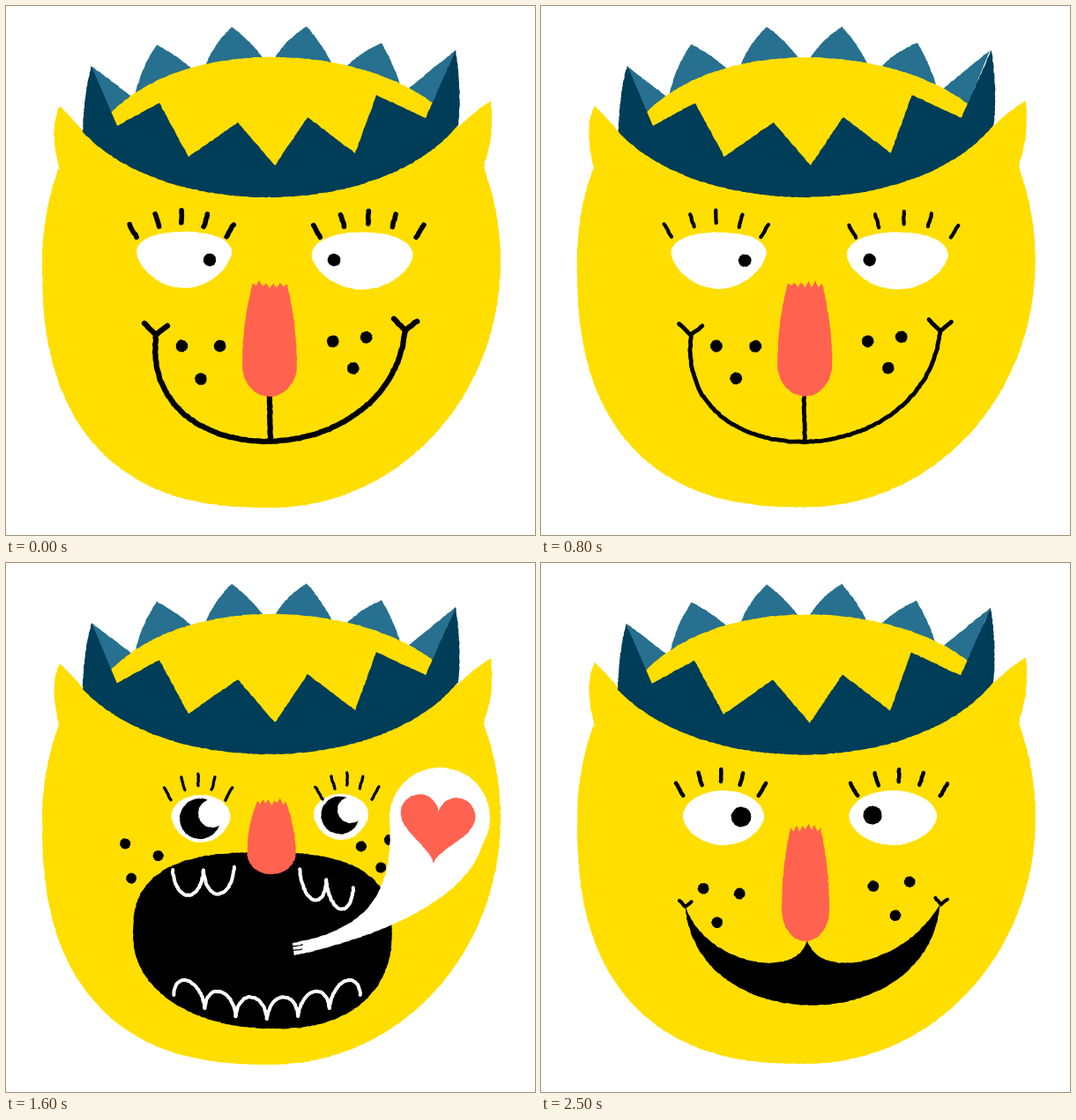
Write an HTML page with a canvas that moves like this. It is 600 px wide and 600 px high and loops after 2.6 s.

```html
<!DOCTYPE html>
<html lang="en">
<head>
<meta charset="utf-8">
<title>Yellow creature</title>
<style>
  html, body { margin: 0; width: 100%; height: 100%; overflow: hidden; background: #fff; }
  canvas { display: block; width: 100vw; height: 100vh; }
</style>
</head>
<body>
<canvas id="stage" width="600" height="600"></canvas>
<script>
const ctx = document.getElementById('stage').getContext('2d');
const YELLOW = '#ffde00', NAVY = '#003d58', TEAL = '#27708f', CORAL = '#ff6350';
const STEP = 100, STEPS = 26;

// eyes: x, y, rx, ry, lift of the corners
// pupils: dx, dy, radius, then dx, dy, radius of the glint
// nose: x, top, bottom, half width at top, half width at bottom
// spots: x, y, radius of the group, turn in degrees
const smile = {
  shift: [0, 0], line: 5.6, dot: 6.8,
  eyes: [[202, 288, 54, 32, -9], [404, 289, 57.5, 32.5, -7]],
  pupils: [[29, 0, 7.2, 6, -6, 0], [-32, -1, 7.2, 6, -6, 0]],
  nose: [299, 315, 443, 19.5, 31],
  spots: [[221, 398, 25, 0], [391, 389, 22, -7]]
};
const grin = {
  shift: [0, -1], line: 4.5, dot: 6.3,
  eyes: [[207, 289, 46, 31, -2], [399, 289, 50, 31, -2]],
  pupils: [[20, -1, 11.3, 8, -8, 0], [-23, -3, 10.5, 8, -8, 0]],
  nose: [300, 300, 429, 17, 27],
  spots: [[203, 384, 24, 8], [399, 376, 24, -7]]
};
const wide = {
  shift: [-2, -1.5], line: 4, dot: 5.9,
  eyes: [[218, 290.5, 38, 28.5, -2], [383, 289.5, 35, 28.5, -2]],
  pupils: [[4, 0, 21.5, 17, -13, 9], [-3, -4, 20.5, 16, -13, 9]],
  nose: [301, 283, 375, 23, 29],
  spots: [[165, 352, 25, 16], [417, 346, 22, -13]],
  mouth: [291.5, 425, 144.5, 54, 92],
  teeth: [[192, 387, 263, 375], [329, 376, 391, 382]], bite: 28,
  bubble: { head: [441, 386, 23], top: [390, 413, 405, 400], under: [435, 418, 385, 428] },
  heart: [438, 390, 0.5]
};
const open = {
  shift: [0, 0], line: 3.3, dot: 6,
  eyes: [[221, 290, 33.5, 27, -3], [380, 288, 31, 26, -3]],
  pupils: [[-1, 0, 23, 14, -6, 16], [-1, -2, 21.5, 12, -6, 15]],
  nose: [301, 270, 353, 16, 27.5],
  spots: [[150, 336, 23, 20], [421, 327, 19, -13]],
  mouth: [291, 420, 147, 92, 108],
  teeth: [[189, 348, 259, 345], [333, 347, 394, 368]], bite: 38,
  bubble: { head: [492, 289, 57], top: [415, 415, 440, 370], under: [520, 390, 400, 430] },
  heart: [489, 296, 2.65]
};

function mix(a, b) {
  if (typeof a === 'number') return (a + b) / 2;
  if (Array.isArray(a)) return a.map((v, i) => mix(v, b[i]));
  return Object.fromEntries(Object.keys(a).map(k => [k, mix(a[k], b[k])]));
}
const parting = { ...mix(grin, wide), mouth: [299, 424, 147, 22, 87] };
const POSES = [smile, grin, parting, wide, mix(wide, open), open];

let seed = 1, wobble = 0;
function rnd() {
  seed = (seed * 1664525 + 1013904223) >>> 0;
  return seed / 2147483648 - 1;
}

const range = (n, f) => Array.from({ length: n }, (_, i) => f(i));
const power = (v, e) => Math.sign(v) * Math.abs(v) ** e;

// Bezier curve of any degree, given as x, y, x, y, ...
function curve(...c) {
  return range(25, i => {
    let p = range(c.length / 2, k => [c[2 * k], c[2 * k + 1]]);
    while (p.length > 1) {
      p = p.slice(1).map((q, k) => q.map((v, d) => p[k][d] + (v - p[k][d]) * i / 24));
    }
    return p[0];
  });
}

function arc(x, y, rx, ry, from = 0, to = 2 * Math.PI) {
  return range(49, i => {
    const a = from + (to - from) * i / 48;
    return [x + rx * Math.cos(a), y + ry * Math.sin(a)];
  });
}

// Walks the points in short steps with a grainy, hand-drawn edge.
function trace(pts) {
  const dx = rnd() * wobble, dy = rnd() * wobble;
  ctx.beginPath();
  pts.forEach(([x, y], i) => {
    const [px, py] = pts[Math.max(0, i - 1)];
    const n = Math.ceil(Math.hypot(x - px, y - py) / 3) || 1;
    for (let s = 1; s <= n; s++) {
      ctx.lineTo(px + (x - px) * s / n + dx + rnd() * 0.4, py + (y - py) * s / n + dy + rnd() * 0.4);
    }
  });
}

function fill(pts, color) {
  trace(pts);
  ctx.closePath();
  ctx.fillStyle = color;
  ctx.fill();
}

function stroke(pts, width, color = '#000') {
  trace(pts);
  ctx.lineWidth = width;
  ctx.strokeStyle = color;
  ctx.stroke();
}

const disc = (x, y, r, color = '#000') => fill(arc(x, y, r, r), color);

function drawHead([dx, dy]) {
  const body = range(81, i => {
    const a = -0.38 + (Math.PI + 0.76) * i / 80;
    const c = Math.cos(a), s = Math.sin(a);
    const e = c < 0 && s > 0 ? 0.8 : 1;
    return [301 + 260 * power(c, e), 290 + (s < 0 ? 285 : 279) * power(s, e)];
  });
  ctx.save();
  ctx.translate(dx, dy);
  fill([
    ...body,
    ...curve(61, 187, 48, 138, 61, 114), ...curve(61, 114, 74, 126, 88, 143),
    ...curve(513, 137, 537, 115, 550, 108), ...curve(550, 108, 554, 148, 543, 177)
  ], YELLOW);
  ctx.restore();
}

function drawCrown(dy) {
  const bow = (x, top, k) => top + (x - 301) ** 2 / k;
  ctx.save();
  ctx.translate(0, dy);
  for (let i = 0; i < 4; i++) {
    const x = 171 + 85 * i, y = bow(x, 21, 735), skew = (300 - x) / 15;
    const l = x - 33 + skew, r = x + 32 + skew;
    const ly = bow(l, 58, 570), ry = bow(r, 58, 570);
    fill([...curve(l, ly, (l + x) / 2 - 5, (ly + y) / 2 - 3, x, y),
          ...curve(x, y, (r + x) / 2 + 3, (ry + y) / 2 - 2, r, ry), [x, 110]], TEAL);
  }
  fill([[97, 68], [143, 103], [118, 124]], TEAL);
  fill([[510, 50], [457, 93], [484, 112]], TEAL);
  fill([...curve(119, 121, 205, 34, 395, 43, 484, 110), [500, 140], [300, 200], [110, 145]], YELLOW);
  fill([
    ...curve(97, 68, 88, 100, 87, 143), ...curve(87, 143, 180, 243, 425, 243, 513, 135),
    ...curve(513, 135, 517, 95, 510, 50),
    [476, 127], [420, 101], [396, 167], [342, 126], [305, 181], [263, 132], [207, 171], [174, 110], [126, 136]
  ], NAVY);
  ctx.restore();
}

function drawEye([x, y, rx, ry, lift], [px, py, pr, gx, gy, gr], lean, width) {
  fill(arc(0, 0, 1, 1).map(([c, s]) => [x + rx * c, y + ry * power(s, 1.1) + lift * c * c]), '#fff');
  disc(x + px, y + py, pr);
  if (gr) disc(x + px + gx, y + py + gy, gr, '#fff');
  for (let u = -1; u <= 1; u += 0.5) {
    const lx = x + lean + (rx + 5) * u, ly = y - ry - 24 + 16 * u * u;
    stroke([[lx, ly], [lx - 8 * u, ly + 14]], width);
  }
}

function drawSpots([x, y, r, turn], size) {
  for (let k = 0; k < 3; k++) {
    const a = (90 + turn + 120 * k) * Math.PI / 180;
    disc(x + r * Math.cos(a), y + r * Math.sin(a), size);
  }
}

function drawNose([x, top, bottom, wt, wb]) {
  const low = top + (bottom - top) * 0.72, mid = (top + low) / 2;
  const ragged = range(9, i => [x + wt * (1 - (i + 1) / 5), top + (i % 2 ? -2 : 4) + rnd() * 2]);
  fill([
    ...curve(x - wt, top, x - wb, mid, x - wb, low),
    ...arc(x, low, wb, bottom - low, Math.PI, 0),
    ...curve(x + wb, low, x + wb, mid, x + wt, top),
    ...ragged
  ], CORAL);
}

function drawCorner(x, y, size, width) {
  stroke([[x - size, y - size], [x, y], [x + size, y - 0.8 * size]], width);
}

function drawSmile(width) {
  stroke(curve(170, 373, 150, 535, 435, 535, 453, 368), width);
  stroke([[299, 443], [300, 494]], width);
  drawCorner(170, 373, 13, width);
  drawCorner(453, 368, 13, width);
}

function drawGrin() {
  fill([
    ...curve(163, 388, 185, 455, 290, 475, 302, 428),
    ...curve(302, 428, 316, 475, 415, 455, 453, 386),
    ...curve(453, 386, 440, 540, 175, 540, 163, 388)
  ], '#000');
  drawCorner(164, 390, 7, 4);
  drawCorner(454, 387, 7, 4);
}

function drawMouth([x, y, rx, up, down]) {
  fill(arc(0, 0, 1, 1).map(([c, s]) => {
    const e = s < 0 ? 0.75 : 0.9;
    return [x + rx * power(c, e), y + (s < 0 ? up : down) * power(s, e) + 9 * c * Math.max(0, s)];
  }), '#000');
}

function drawTeeth(x0, y0, x1, y1, count, bow, bite) {
  const at = i => {
    const u = i / count;
    return [x0 + (x1 - x0) * u, y0 + (y1 - y0) * u + 4 * bow * u * (1 - u)];
  };
  for (let i = 0; i < count; i++) {
    const [ax, ay] = at(i), [bx, by] = at(i + 1);
    stroke(curve(ax, ay, ax + 3, ay + bite, bx - 3, by + bite, bx, by), 4, '#fff');
  }
}

function drawBubble({ head: [x, y, r], top, under }, [hx, hy, size]) {
  const end = 0.55;
  fill([
    ...curve(325, 431, ...top, x - r, y),
    ...arc(x, y, r, r, Math.PI, 2 * Math.PI + end),
    ...curve(x + r * Math.cos(end), y + r * Math.sin(end), ...under, 327, 445)
  ], '#fff');
  for (const fy of [435, 440]) stroke([[323, fy], [336, fy - 2]], 1.2);
  fill(range(60, i => {
    const t = i * Math.PI / 30;
    const u = 16 * Math.sin(t) ** 3;
    const v = 5 * Math.cos(2 * t) + 2 * Math.cos(3 * t) + Math.cos(4 * t) - 13 * Math.cos(t);
    return [hx + size * (u - 0.1 * v), hy + size * (v + 0.1 * u)];
  }), CORAL);
}

function draw(step) {
  const k = step < 9 ? 0 : step < 13 ? step - 8 : step < 22 ? 5 : STEPS - step;
  const take = k === 0 ? step % 3 : k === 5 ? (step - 13) % 3 : 0;
  const p = POSES[k];
  const line = p.line - (k === 0 ? take * 0.7 : 0);
  seed = 977 * (k * 3 + take + 1);
  wobble = take ? 0.8 : 0;

  ctx.fillStyle = '#fff';
  ctx.fillRect(0, 0, 600, 600);
  ctx.lineCap = ctx.lineJoin = 'round';
  drawHead(p.shift);
  drawCrown(-p.shift[1] / 2);
  drawEye(p.eyes[0], p.pupils[0], -3, line);
  drawEye(p.eyes[1], p.pupils[1], 7, line);
  p.spots.forEach(s => drawSpots(s, p.dot));
  if (k === 0) drawSmile(line + 0.6);
  if (k === 1) drawGrin();
  if (p.mouth) drawMouth(p.mouth);
  if (p.teeth) {
    p.teeth.forEach(row => drawTeeth(...row, 2, 2, p.bite));
    drawTeeth(190, 490, 402, 490, 6, 27, -31);
  }
  drawNose(p.nose);
  if (p.bubble) drawBubble(p.bubble, p.heart);
}

let shown = -1;
function tick(now) {
  const step = Math.floor(now / STEP) % STEPS;
  if (step !== shown) draw(shown = step);
  requestAnimationFrame(tick);
}
tick(performance.now());
</script>
</body>
</html>
```
